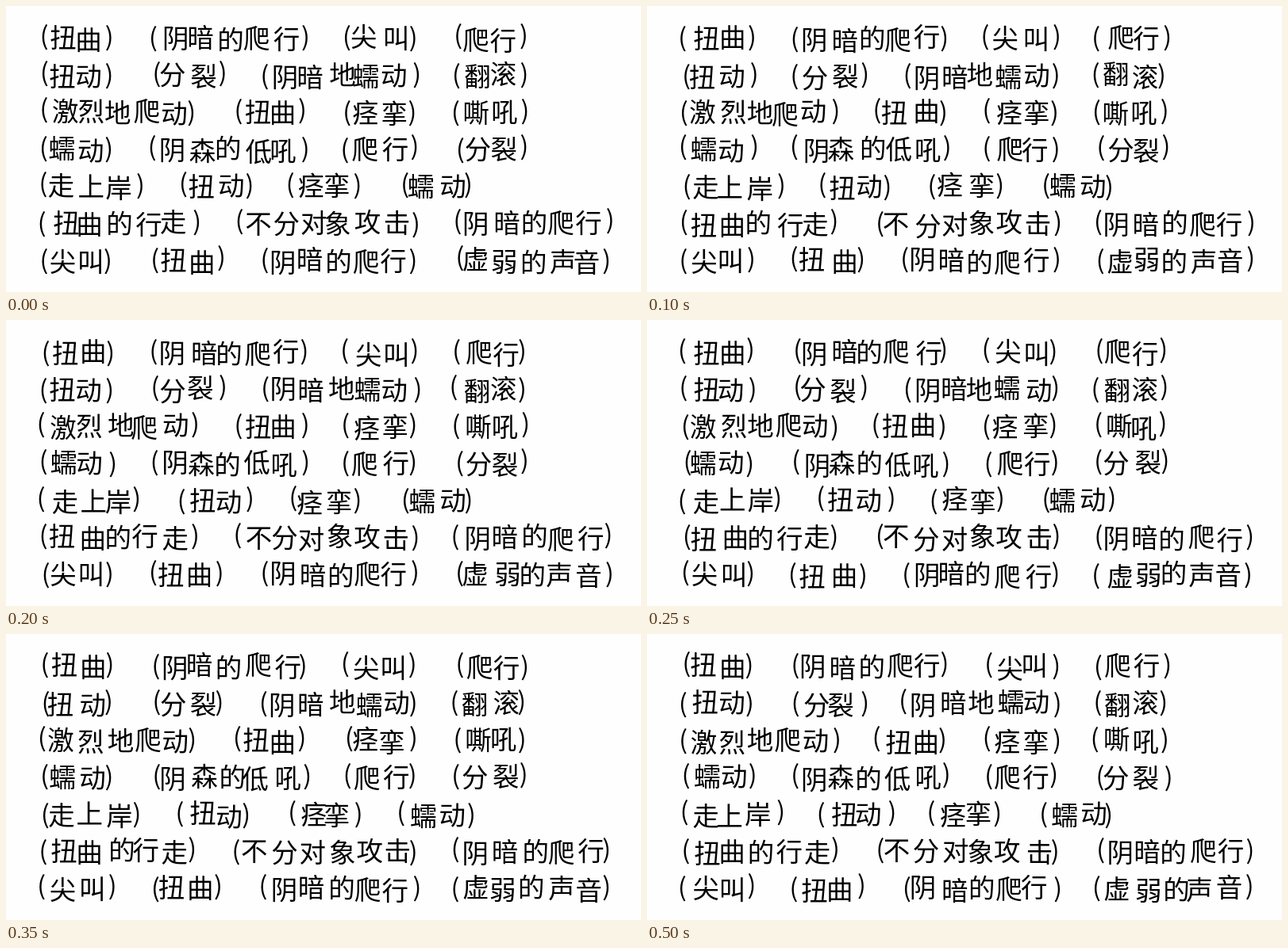
An HTML page with a canvas for the animation above (550 ms loop, 800 by 361 pixels).

```html
<!DOCTYPE html>
<html lang="zh-CN">
<head>
<meta charset="utf-8">
<style>
  html, body { margin: 0; overflow: hidden; background: #fefefe; }
  canvas { display: block; }
</style>
</head>
<body>
<canvas id="stage" width="800" height="361"></canvas>
<script>
const ctx = document.getElementById('stage').getContext('2d');
const FAMILY = '"Noto Sans CJK SC", "Noto Sans CJK", sans-serif';
const STEP_MS = 50, STEPS = 11;
const FIRST_ROW = 40.5, ROW_PITCH = 46.75, PITCH = 35.1, BRACKET_GAP = 24.8;
const JITTER_X = 3.4, JITTER_Y = 2.3;

// Each row alternates the opening bracket's centre and the bracketed words.
const rows = [
  [47, '扭曲', 187, '阴暗的爬行', 429, '尖叫', 569, '爬行'],
  [47, '扭动', 187, '分裂', 326, '阴暗地蠕动', 567, '翻滚'],
  [47, '激烈地爬动', 290, '扭曲', 429, '痉挛', 567, '嘶吼'],
  [48, '蠕动', 187, '阴森的低吼', 430, '爬行', 569, '分裂'],
  [47, '走上岸', 221, '扭动', 360, '痉挛', 500, '蠕动'],
  [48, '扭曲的行走', 291, '不分对象攻击', 569, '阴暗的爬行'],
  [47, '尖叫', 186, '扭曲', 325, '阴暗的爬行', 569, '虚弱的声音']
];

const glyphs = [];
rows.forEach((row, r) => {
  const y = FIRST_ROW + r * ROW_PITCH;
  for (let i = 0; i < row.length; i += 2) {
    const start = row[i], first = start + BRACKET_GAP, words = [...row[i + 1]];
    glyphs.push({ char: '(', x: start, y });
    words.forEach((char, n) => glyphs.push({ char, x: first + n * PITCH, y }));
    glyphs.push({ char: ')', x: first + (words.length - 1) * PITCH + BRACKET_GAP, y });
  }
});

// Seeded generator returning values from -1 to 1.
function seeded(seed) {
  return () => {
    seed = (seed + 0x6D2B79F5) | 0;
    let t = Math.imul(seed ^ (seed >>> 15), 1 | seed);
    t = (t + Math.imul(t ^ (t >>> 7), 61 | t)) ^ t;
    return ((t ^ (t >>> 14)) >>> 0) / 2147483648 - 1;
  };
}

function draw(step) {
  const random = seeded(step * 7919 + 17);
  ctx.fillStyle = '#fefefe';
  ctx.fillRect(0, 0, 800, 361);
  ctx.fillStyle = '#000';
  ctx.textAlign = 'center';
  for (const { char, x, y } of glyphs) {
    const bracket = char === '(' || char === ')';
    ctx.font = `${bracket ? 32 : 33.5}px ${FAMILY}`;
    ctx.fillText(char, x + random() * JITTER_X, y + (bracket ? 9.5 : 13) + random() * JITTER_Y);
  }
}

function tick() {
  draw(Math.floor(performance.now() / STEP_MS) % STEPS);
  requestAnimationFrame(tick);
}
tick();
</script>
</body>
</html>
```
